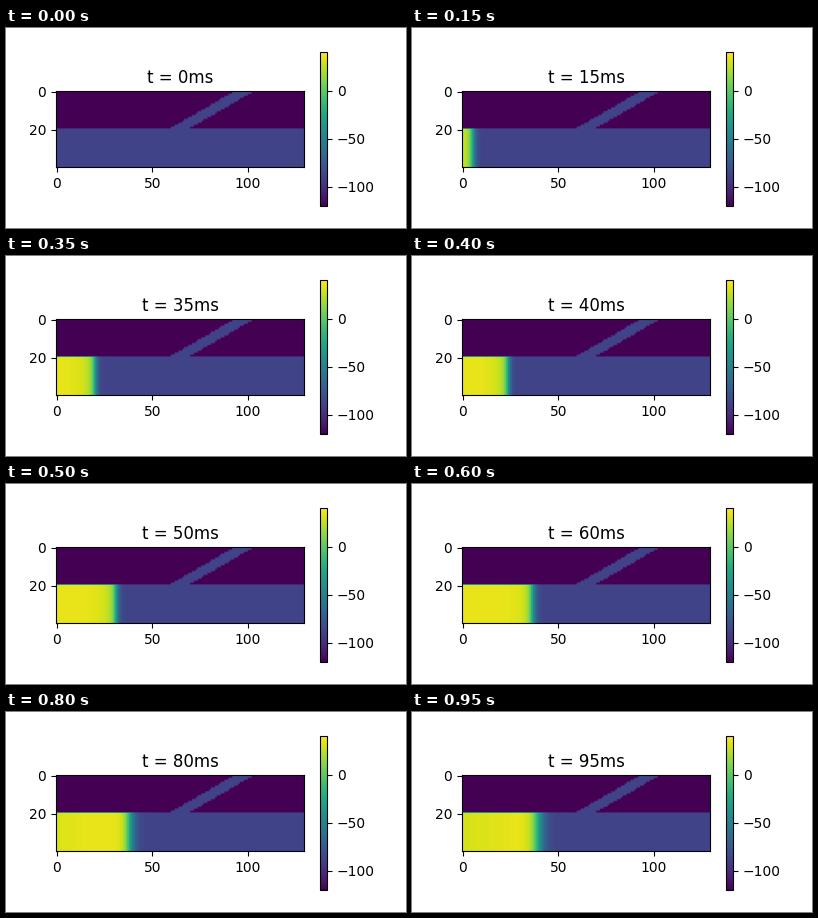
A matplotlib script that plays this animation: 400x200 px, repeating every 1 s.

```python
import numpy as np
import matplotlib.pyplot as plt
from matplotlib.animation import FuncAnimation

ROWS, COLS, STRIP_TOP = 40, 130, 20
OUTSIDE, REST, PEAK = -120, -88, 35
STEP_MS, FRAMES = 5, 20

SPEED, START = 0.735, -5.5  # columns per ms, front position at t = 0
SLOW_FROM, SLOW_SPEED = 57, 0.08  # the front nearly stalls after this time

cols = np.arange(COLS)
arrival = (cols - START) / SPEED


def tissue_mask():
    """A strip along the bottom with an oblique side branch."""
    y, x = np.mgrid[:ROWS, :COLS]
    offset = x - 60 - np.sqrt(3) * (STRIP_TOP - 1 - y)
    return (y >= STRIP_TOP) | ((offset >= 0) & (offset < 10))


def strip_voltage(t):
    """Steep upstroke, slow approach to the peak, then a gentle decline."""
    front = START + SPEED * min(t, SLOW_FROM) + SLOW_SPEED * max(t - SLOW_FROM, 0)
    width = 0.9 + 0.025 * max(t - 50, 0)
    age = np.maximum(t - arrival, 0)
    plateau = PEAK - 28 * np.exp(-age / 6) - 0.13 * np.maximum(age - 45, 0)
    rise = 0.5 * (1 + np.tanh((front - cols) / (2 * width)))
    return REST + (plateau - REST) * rise


resting = np.where(tissue_mask(), float(REST), float(OUTSIDE))

fig = plt.figure(figsize=(4, 2), dpi=100)
ax = fig.add_subplot()
image = ax.imshow(resting, vmin=OUTSIDE, vmax=40, cmap="viridis")
fig.colorbar(image)
title = ax.set_title("t = 0ms")


def update(frame):
    t = frame * STEP_MS
    voltage = resting.copy()
    if t > 0:
        voltage[STRIP_TOP:] = strip_voltage(t)
    image.set_data(voltage)
    title.set_text(f"t = {t}ms")
    return image, title


anim = FuncAnimation(fig, update, frames=FRAMES, interval=50, repeat=True, repeat_delay=0)
plt.show()
```
